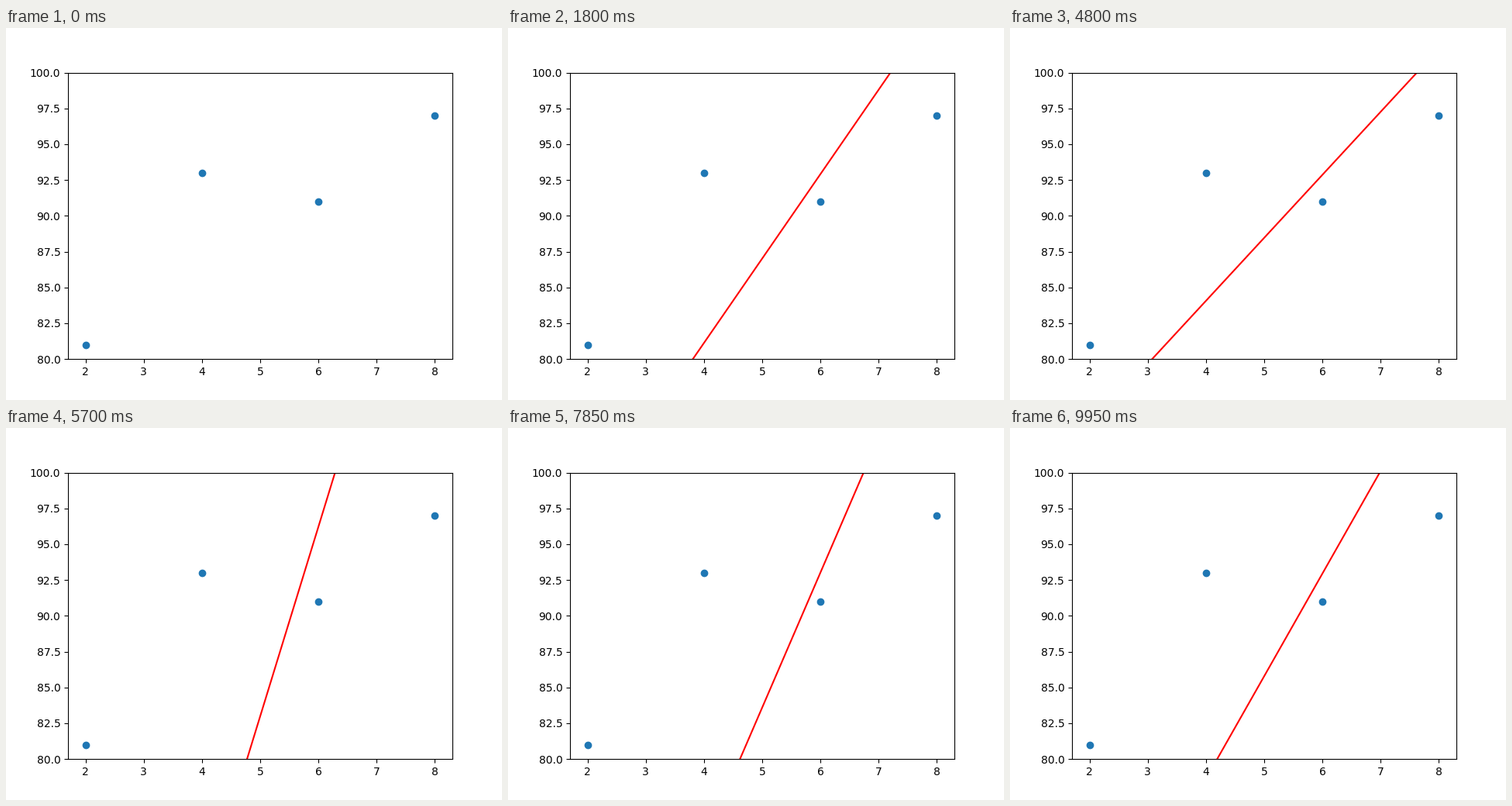
Animation of 640 by 480 pixels, one loop 10000 ms. Source, as a matplotlib script:

```python
import numpy as np
import matplotlib.pyplot as plt
from matplotlib.animation import FuncAnimation

STEPS = 200
RATE = 0.03

x = np.array([2, 4, 6, 8])
y = np.array([81, 93, 91, 97])


def fit_history():
    """Slope and intercept before each gradient descent step."""
    a = b = 0.0
    history = []
    for _ in range(STEPS):
        history.append((a, b))
        error = y - (a * x + b)
        a += RATE * 2 * np.mean(x * error)
        b += RATE * 2 * np.mean(error)
    return history


history = fit_history()
# The steps play in alphabetical order: 0, 1, 10, 100, 101, ...
order = sorted(range(STEPS), key=str)

fig, ax = plt.subplots(figsize=(6.4, 4.8), dpi=100)
ax.scatter(x, y)
ax.set_xlim(1.7, 8.3)
ax.set_ylim(80, 100)
line, = ax.plot(x, 0 * x, color="red")


def update(i):
    a, b = history[order[i]]
    line.set_ydata(a * x + b)
    return line,


anim = FuncAnimation(fig, update, frames=STEPS, interval=50, repeat=True)
plt.show()
```
